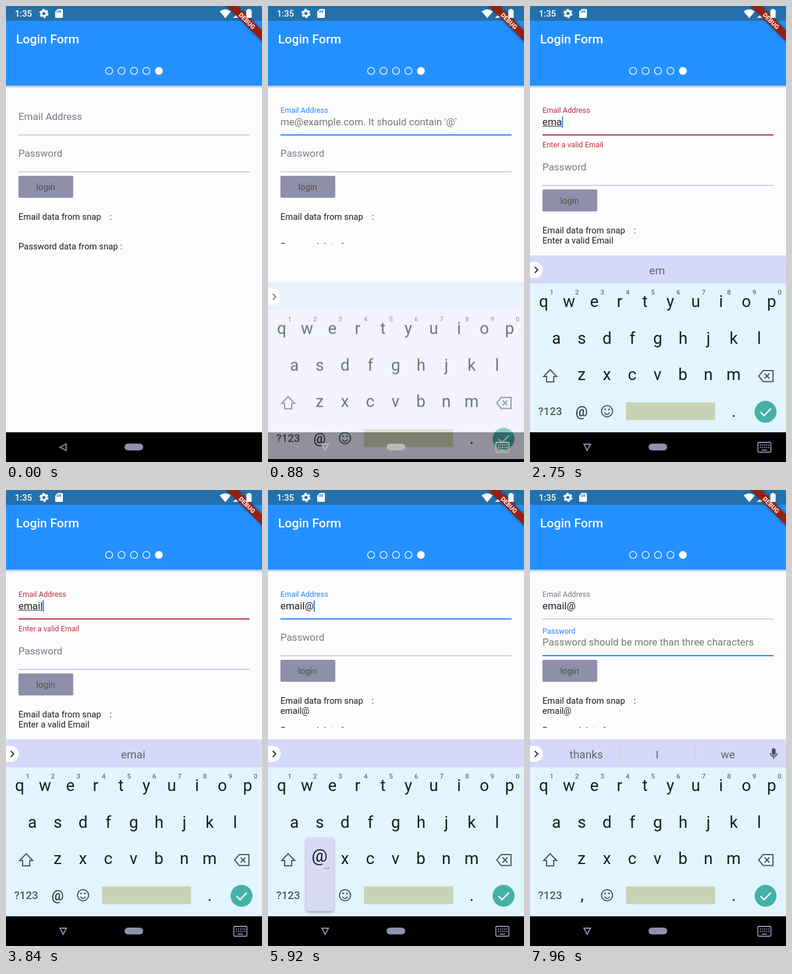
Write an HTML page that moves like this. It is 432 by 768 pixels and loops after 8000 ms.

```html
<!DOCTYPE html>
<html lang="en">
<head>
<meta charset="utf-8">
<title>Login Form</title>
<style>
  html, body { margin: 0; width: 100%; height: 100%; overflow: hidden; background: #fcfcff; }
  svg { display: block; width: 100%; height: 100%; font-family: Roboto, sans-serif; }
  text { white-space: pre; }
  .field { font-size: 16.8px; }
  .small { font-size: 12.6px; }
  .body { font-size: 14.7px; fill: #1c1c1c; }
  .hint { font-size: 16.8px; fill: #777; }
  .key { font-size: 27.5px; fill: #14201c; text-anchor: middle; }
  .digit { font-size: 11.5px; font-weight: 500; fill: #6b6f7c; text-anchor: middle; }
  .word { font-size: 18.8px; fill: #62646c; text-anchor: middle; }
  .line { fill: none; stroke: #525a62; stroke-width: 2; }
</style>
</head>
<body>
<svg viewBox="0 0 432 768" preserveAspectRatio="none">
  <defs>
    <clipPath id="bodyClip"><rect id="bodyBox" y="134" width="432"/></clipPath>
    <linearGradient id="shade" x2="0" y2="1">
      <stop stop-color="#b4bce8"/><stop offset="1" stop-color="#fcfcff"/>
    </linearGradient>
    <filter id="blur" x="-30%" y="-90%" width="160%" height="280%"><feGaussianBlur stdDeviation="2.5"/></filter>
  </defs>
  <rect width="432" height="768" fill="#fcfcff"/>

  <g clip-path="url(#bodyClip)">
    <text id="emailLabel" x="21">Email Address</text>
    <text id="emailHint" class="hint" x="21" y="200.5">me@example.com. It should contain '@'</text>
    <text id="typed" class="field" x="21" y="200.5" fill="#1c1c1c"></text>
    <rect id="composing" x="21" y="202" height="1" fill="#333"/>
    <rect id="cursor" width="2" height="19" fill="#4285f4"/>
    <rect x="21" y="216.7" width="390" height="1" fill="#a6a6ba"/>
    <rect id="emailLine" x="21" y="216.2" width="390" height="2"/>
    <text id="error" class="small" x="21" fill="#c62f3e">Enter a valid Email</text>
    <g id="lower">
      <text id="passLabel" x="21">Password</text>
      <text id="passHint" class="hint" x="21" y="262">Password should be more than three characters</text>
      <rect x="21" y="278.7" width="390" height="1" fill="#a6a6ba"/>
      <rect id="passLine" x="21" y="278" width="390" height="2" fill="#2487ff"/>
      <rect x="21" y="286" width="92.5" height="37" rx="2" fill="#8f8fab"/>
      <text class="body" x="67" y="310" text-anchor="middle" style="fill:#53513f">login</text>
      <text class="body" x="21" y="360">Email data from snap    :</text>
      <text id="snap" class="body" x="21" y="377"></text>
      <text class="body" x="21" y="410">Password data from snap :</text>
    </g>
  </g>

  <rect y="134" width="432" height="5" fill="url(#shade)"/>
  <rect width="432" height="134" fill="#2490ff"/>
  <rect width="432" height="25" fill="#2470ab"/>
  <text x="17" y="62.5" font-size="21" font-weight="500" fill="#fff">Login Form</text>
  <g id="dots" fill="none" stroke="#fff" stroke-width="1.3"></g>
  <g fill="#fff">
    <text x="15" y="18.3" font-size="14.7" font-weight="500">1:35</text>
    <circle cx="64" cy="12.5" r="4.3" fill="none" stroke="#fff" stroke-width="3.4"/>
    <circle cx="64" cy="12.5" r="6.4" fill="none" stroke="#fff" stroke-width="2.6" stroke-dasharray="3.8 2.9"/>
    <path d="M87.5 5H94.5Q96 5 96 6.5V18.5Q96 20 94.5 20H84.5Q83 20 83 18.5V9.5Z"/>
    <path d="M86.5 8.5v3M89.3 7v4.5M92.2 7v4.5" stroke="#2470ab" stroke-width="1.4"/>
    <path d="M360.500 9Q370 2 379.500 9L370 20.500Z"/>
    <path d="M398 5.500V20H383Z"/>
  </g>
  <g transform="translate(432 0) rotate(45)">
    <rect x="-46" y="29.4" width="92" height="12.6" opacity=".5" filter="url(#blur)"/>
    <rect x="-46" y="29.4" width="92" height="12.6" fill="#96200f"/>
    <text y="39.5" font-size="10.7" font-weight="900" fill="#f6e6e2" text-anchor="middle">DEBUG</text>
  </g>
  <path d="M408 5h4v1.500h2.500V20h-9V6.500H408Z" fill="#fff"/>

  <rect y="718" width="432" height="50"/>
  <g id="keyboard">
    <rect id="board" y="420" width="432" height="298"/>
    <rect id="strip" y="420" width="432" height="47"/>
    <path d="M0 431H8A13.5 13.5 0 0 1 8 458H0Z" fill="#fff"/>
    <path class="line" d="M8 439.500l5 5l-5 5" style="stroke:#333"/>
    <text id="guess" class="word" x="214.5" y="451.5"></text>
    <g id="words">
      <text class="word" x="95" y="451.5">thanks</text>
      <text class="word" x="214.5" y="451.5">I</text>
      <text class="word" x="334" y="451.5">we</text>
      <path d="M152.500 432v24M278.500 432v24" stroke="#c6c8c4"/>
      <rect x="408" y="435" width="6.500" height="11.500" rx="3.200" fill="#4a4e54"/>
      <path class="line" d="M405.500 443a5.700 5.700 0 0 0 11.500 0M411.200 449v4" style="stroke-width:1.7;stroke:#4a4e54"/>
    </g>
    <g id="keys"></g>
    <path class="line" d="M34 612.500L45 624H40V633H28V624H23Z"/>
    <path class="line" d="M393.500 614H410V632.500H393.500L386 623.200ZM396 619l8 8.500M404 619l-8 8.500"/>
    <text x="34" y="689" font-size="18.5" font-weight="500" fill="#525a62" text-anchor="middle">?123</text>
    <text id="symbol" class="key" y="691"></text>
    <circle class="line" cx="130" cy="682.500" r="9.400"/>
    <path class="line" d="M125.500 685Q130 691 134.500 685"/>
    <path d="M125.300 679.500h3M131.700 679.500h3" stroke="#525a62" stroke-width="2.600"/>
    <rect x="162" y="667.500" width="150.500" height="30" rx="2" fill="#cad2b6"/>
    <text class="key" x="344" y="692">.</text>
    <circle cx="397.500" cy="683.500" r="18.500" fill="#45b1a6"/>
    <path d="M389 684l6 6l11.500 -12" fill="none" stroke="#fff" stroke-width="2.400"/>
    <g id="popup">
      <rect x="-23" y="-104" width="47" height="124" rx="5" fill="#777b90" opacity=".6" filter="url(#blur)"/>
      <rect x="-23" y="-107" width="47" height="124" rx="5" fill="#d8d9f6"/>
      <text id="popupKey" class="key" y="-66" style="font-size:30px"></text>
      <text id="more" x="12" y="-54" font-size="14" fill="#333" text-anchor="middle">...</text>
    </g>
  </g>
  <g id="nav">
    <path id="back" d="M91 743L101.500 737.500V748.500Z" fill="none" stroke="currentColor" stroke-width="1.900"/>
    <rect x="200" y="737" width="31.500" height="11.500" rx="5.700" fill="currentColor"/>
    <g id="ime" fill="none" stroke="currentColor">
      <rect x="384.500" y="735" width="22" height="16.500" rx="1.500" stroke-width="1.800"/>
      <path d="M388 739.500h16M388 743.500h16" stroke-width="2" stroke-dasharray="2 1.500"/>
      <path d="M391 748h9" stroke-width="1.800"/>
    </g>
  </g>
</svg>
<script>
const LOOP = 8000, FOCUS = 640, INSET = 820, INVALID = 1570, VALID = 5690, NEXT = 7350, SWAP = 7550;
const BLUE = [36, 135, 255], RED = [186, 46, 60], GREY = [122, 122, 128];
const ROWS = [
  { keys: 'qwertyuiop', x: 23, y: 507 },
  { keys: 'asdfghjkl', x: 44.5, y: 568.5 },
  { keys: 'zxcvbnm', x: 87, y: 630 },
  { keys: '@', x: 87, y: 692 }
];
const STEP = 42.75;
// time of commit, key, how long its popup shows before and after
const STROKES = [
  [1570, 'e', 100, 10], [2200, 'm', 100, 10], [2700, 'a', 100, 10],
  [3250, 'i', 100, 10], [3800, 'l', 100, 10], [5690, '@', 120, 270]
];

const ui = {};
document.querySelectorAll('[id]').forEach(el => ui[el.id] = el);
const set = (el, attrs) => { for (const k in attrs) el.setAttribute(k, attrs[k]); };
const show = (el, on) => set(el, { opacity: +on });
const write = (el, s) => { if (el.textContent !== s) el.textContent = s; };
const ramp = (t, start, length) => Math.min(1, Math.max(0, (t - start) / length));
const ease = p => p * p * (3 - 2 * p);
const blend = (a, b, p) => a.map((v, i) => Math.round(v + (b[i] - v) * p));
const mix = (a, b, p) => `rgb(${blend(a, b, p)})`;

ui.dots.innerHTML = [0, 1, 2, 3, 4].map(i =>
  `<circle cx="${174 + 21 * i}" cy="109.3" r="5.9" ${i === 4 ? 'fill="#fff"' : ''}/>`).join('');

const places = {};
ROWS.forEach(({ keys, x, y }, row) => [...keys].forEach((key, i) => {
  const cx = x + STEP * i;
  places[key] = [cx, y];
  if (row === 3) return;
  ui.keys.innerHTML += `<text class="key" x="${cx}" y="${y}">${key}</text>`;
  if (row === 0) ui.keys.innerHTML += `<text class="digit" x="${cx + 13.5}" y="486">${(i + 1) % 10}</text>`;
}));

function floatLabel(el, p, restY, color) {
  set(el, { y: restY - 12 * p, 'font-size': 16.8 - 4.2 * p, fill: color });
}

function drawForm(t) {
  const focus = ease(ramp(t, FOCUS, 200)), next = ease(ramp(t, NEXT, 200));
  const invalid = ramp(t, INVALID, 200) - ramp(t, VALID, 200);
  const pushed = t >= INVALID && t < VALID;
  const accent = blend(BLUE, RED, invalid);
  const done = STROKES.filter(s => s[0] <= t);
  const text = done.map(s => s[1]).join('');

  set(ui.bodyBox, { height: t < INSET ? 584 : 266.4 });
  floatLabel(ui.emailLabel, focus, 192, mix(GREY, accent, focus - next));
  set(ui.emailHint, { opacity: focus * (1 - ramp(t, INVALID, 200)) });
  set(ui.emailLine, { fill: `rgb(${accent})`, opacity: focus - next });
  set(ui.error, { y: 234.5 + 3.5 * invalid, opacity: invalid });
  set(ui.lower, { transform: `translate(0 ${pushed ? 23 : 0})` });
  floatLabel(ui.passLabel, next, 254, mix(GREY, BLUE, next));
  set(ui.passHint, { opacity: next });
  set(ui.passLine, { opacity: next });
  write(ui.snap, pushed ? 'Enter a valid Email' : t >= VALID ? 'email@' : '');

  write(ui.typed, text);
  const width = text ? ui.typed.getComputedTextLength() : 0;
  set(ui.composing, { width, opacity: +pushed });
  const inPassword = t >= NEXT;
  const since = t - (inPassword ? NEXT : text ? done[done.length - 1][0] : 900);
  set(ui.cursor, { x: 21 + (inPassword ? 0 : width), y: inPassword ? 248 : 186 });
  show(ui.cursor, since >= 0 && since % 1000 < 500);
}

function drawKeyboard(t) {
  const slide = ramp(t, 850, 250), fade = ramp(t, 840, 67);
  set(ui.keyboard, { opacity: fade, transform: `translate(0 ${59 * (1 - slide) ** 2})` });
  set(ui.board, { fill: mix([240, 236, 255], [226, 244, 253], slide) });
  set(ui.strip, { fill: mix([220, 240, 252], [214, 216, 250], slide) });
  const guess = t < VALID ? STROKES.filter(s => s[0] + (s[1] === 'e' ? 30 : 120) <= t).map(s => s[1]).join('') : '';
  write(ui.guess, guess);
  show(ui.words, t >= SWAP);
  write(ui.symbol, t < SWAP ? '@' : ',');
  set(ui.symbol, { x: t < SWAP ? 87 : 88, style: `font-size:${t < SWAP ? 23 : 27.5}px` });

  const stroke = STROKES.find(([at, , before, after]) => t >= at - before && t < at + after);
  show(ui.popup, !!stroke);
  if (stroke) {
    set(ui.popup, { transform: `translate(${places[stroke[1]]})` });
    write(ui.popupKey, stroke[1]);
    show(ui.more, stroke[1] === '@');
  }

  ui.nav.style.color = mix([144, 144, 174], [222, 220, 190], fade * (1 - slide));
  set(ui.back, { transform: `rotate(${-90 * ramp(t, 830, 40)} 96.5 743)` });
  show(ui.ime, t >= 850);
}

const start = performance.now();
function frame(now) {
  const t = Math.max(0, now - start) % LOOP;
  drawForm(t);
  drawKeyboard(t);
  requestAnimationFrame(frame);
}
frame(start);
</script>
</body>
</html>
```
